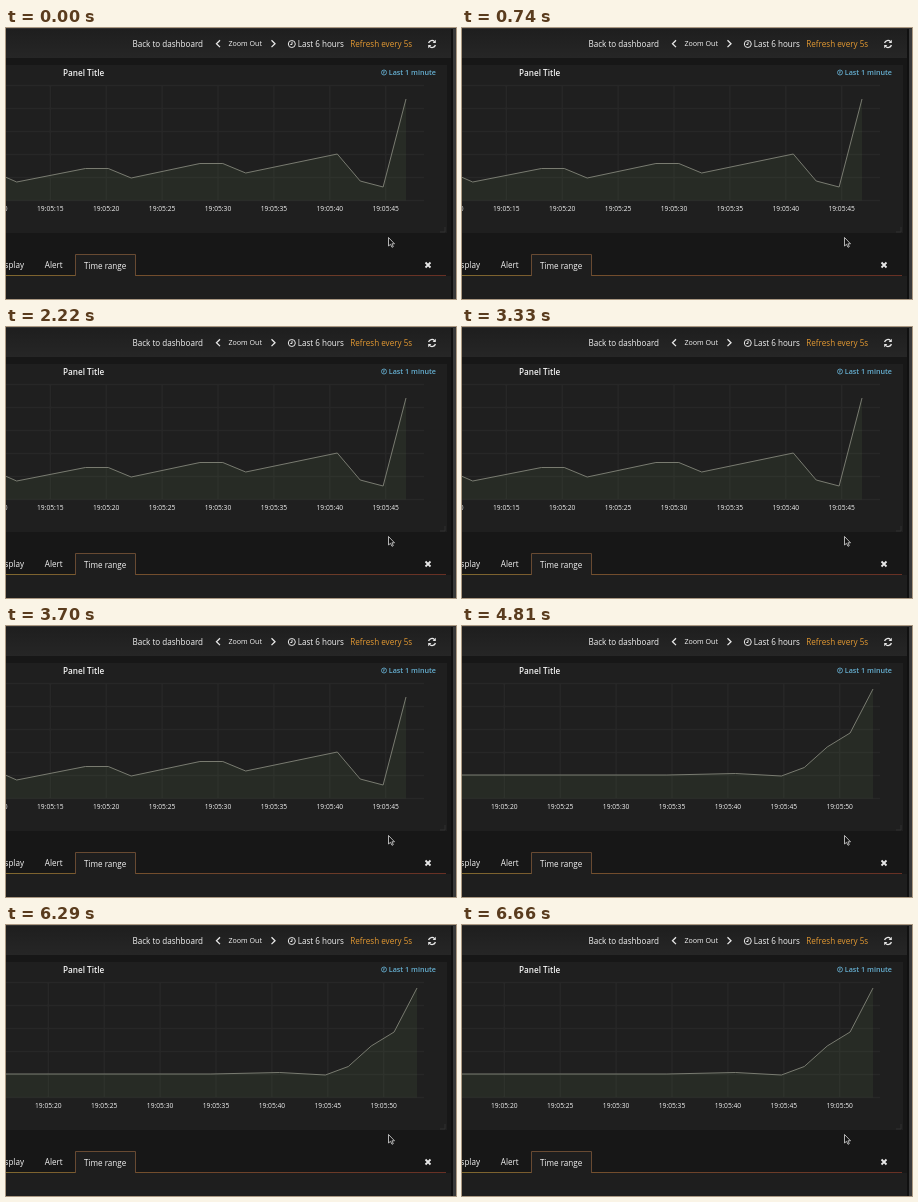
Recreate the animation shown at these times as an HTML page. Size 450 by 271 pixels, loop 8000 ms.

```html
<!DOCTYPE html>
<html lang="en">
<head>
<meta charset="utf-8">
<title>Live graph panel</title>
<style>
html, body { margin: 0; width: 100%; height: 100%; overflow: hidden; background: #171717; }
svg { display: block; width: 100%; height: 100%; }
text { font: 8.1px "Open Sans", sans-serif; fill: #f4f4f4; }
.bold { font-weight: 600; }
.end { text-anchor: end; }
#labels text { font-size: 6.7px; text-anchor: middle; }
#grid { stroke: #272727; stroke-width: 1.5; fill: none; }
.icon { fill: none; stroke: #e8e8e8; stroke-width: 1.3; }
</style>
</head>
<body>
<svg viewBox="0 0 450 271">
  <defs>
    <linearGradient id="bar" x2="0" y2="1">
      <stop stop-color="#1e1e1e"/><stop offset="1" stop-color="#262626"/>
    </linearGradient>
    <linearGradient id="rule" gradientUnits="userSpaceOnUse" x2="440">
      <stop stop-color="#80682f"/><stop offset=".4" stop-color="#70482c"/><stop offset="1" stop-color="#683024"/>
    </linearGradient>
  </defs>

  <rect width="445" height="30" fill="url(#bar)"/>
  <rect y="37" width="441" height="168" fill="#1f1f1f"/>
  <rect y="248" width="445" height="23" fill="#1e1e1e"/>
  <rect x="445" width="2" height="271" fill="#101010"/>
  <rect x="447" width="3" height="271" fill="#393939"/>
  <rect width="450" height="1" fill="#303030"/>

  <text x="126.5" y="19">Back to dashboard</text>
  <path class="icon" d="M214 12.3l-3.5 3.4l3.5 3.4M265.5 12.3l3.5 3.4l-3.5 3.4"/>
  <text x="222.5" y="18" style="font-size:7.1px">Zoom Out</text>
  <g class="icon" style="stroke-width:1"><circle cx="285.8" cy="16" r="3.5"/><path d="M286 13.8v2.7h-1.7"/></g>
  <text x="291.7" y="19">Last 6 hours</text>
  <text x="344.3" y="19" style="fill:#e59a32">Refresh every 5s</text>
  <path class="icon" d="M422.6 15a3.4 3.4 0 0 1 5.9-1.3M429.4 17a3.4 3.4 0 0 1-5.9 1.3"/>
  <path d="M429.8 11.8v3.2h-3.2zM422.2 20.2v-3.2h3.2z" fill="#e8e8e8"/>

  <text class="bold" x="57" y="48" style="font-size:8.2px">Panel Title</text>
  <g fill="none" stroke="#62a8c8" stroke-width=".9"><circle cx="378" cy="44.5" r="2.5"/><path d="M378 43v2h-1"/></g>
  <text class="bold end" x="430" y="47" style="font-size:7.2px;fill:#66b0d2">Last 1 minute</text>

  <path id="grid"/>
  <path id="area" fill="#7eb26d" fill-opacity=".08"/>
  <path id="line" fill="none" stroke="#83857a" stroke-width=".9" stroke-linejoin="round"/>
  <g id="labels"></g>
  <path d="M434 204h5v-5" fill="none" stroke="#303030"/>

  <path d="M0 247.5H69.5M129.500 247.5H440" stroke="url(#rule)"/>
  <path d="M69.5 248V226.5h60V248" fill="#1e1e1e" stroke="#684a32"/>
  <text class="end" x="18" y="240">Display</text>
  <text x="38.8" y="240">Alert</text>
  <text x="78" y="241">Time range</text>
  <path class="icon" style="stroke-width:1.8" d="M419.5 234.5l5 5m0-5l-5 5"/>
  <path d="M382.5 209.5v8.5l2-1.700 1.5 3 1.300-.7-1.400-2.800h2.600z" fill="#111" stroke="#ddd" stroke-width=".8"/>
</svg>
<script>
const LOOP = 8000, REFRESH = 4810, SAMPLE = 22.9, TICK = 55.9;
// "line" maps samples back from the newest to a height; the gaps run straight.
const before = { newest: 400, tick: 44.3, second: 15,
  line: { 0: 71, 1: 159, 2: 153, 3: 126, 7: 145, 8: 135.5, 9: 135.5, 12: 150, 13: 140.5, 14: 140.5, 17: 154, 18: 144 } };
const after = { newest: 411, tick: 42.3, second: 20,
  line: { 0: 63, 1: 107, 2: 121, 3: 141.5, 4: 150, 6: 147.5, 9: 149, 18: 149 } };
const get = id => document.getElementById(id);
let shown;

function draw({ newest, tick, second, line }) {
  const path = "M" + Object.entries(line).map(([n, y]) => [newest - n * SAMPLE, y]).join("L");
  let grid = "", labels = "";
  for (let y = 57.5; y < 175; y += 23) grid += `M0 ${y}H418`;
  for (let i = -1; i < 7; i++) {
    const x = tick + i * TICK;
    grid += `M${x} 57V172`;
    labels += `<text x="${x}" y="183">19:05:${second + i * 5}</text>`;
  }
  get("grid").setAttribute("d", grid);
  get("line").setAttribute("d", path);
  get("area").setAttribute("d", `${path}V172.5H${newest}Z`);
  get("labels").innerHTML = labels;
}

function frame(now) {
  const view = now % LOOP < REFRESH ? before : after;
  if (view !== shown) draw(shown = view);
  requestAnimationFrame(frame);
}
frame(performance.now());
</script>
</body>
</html>
```
